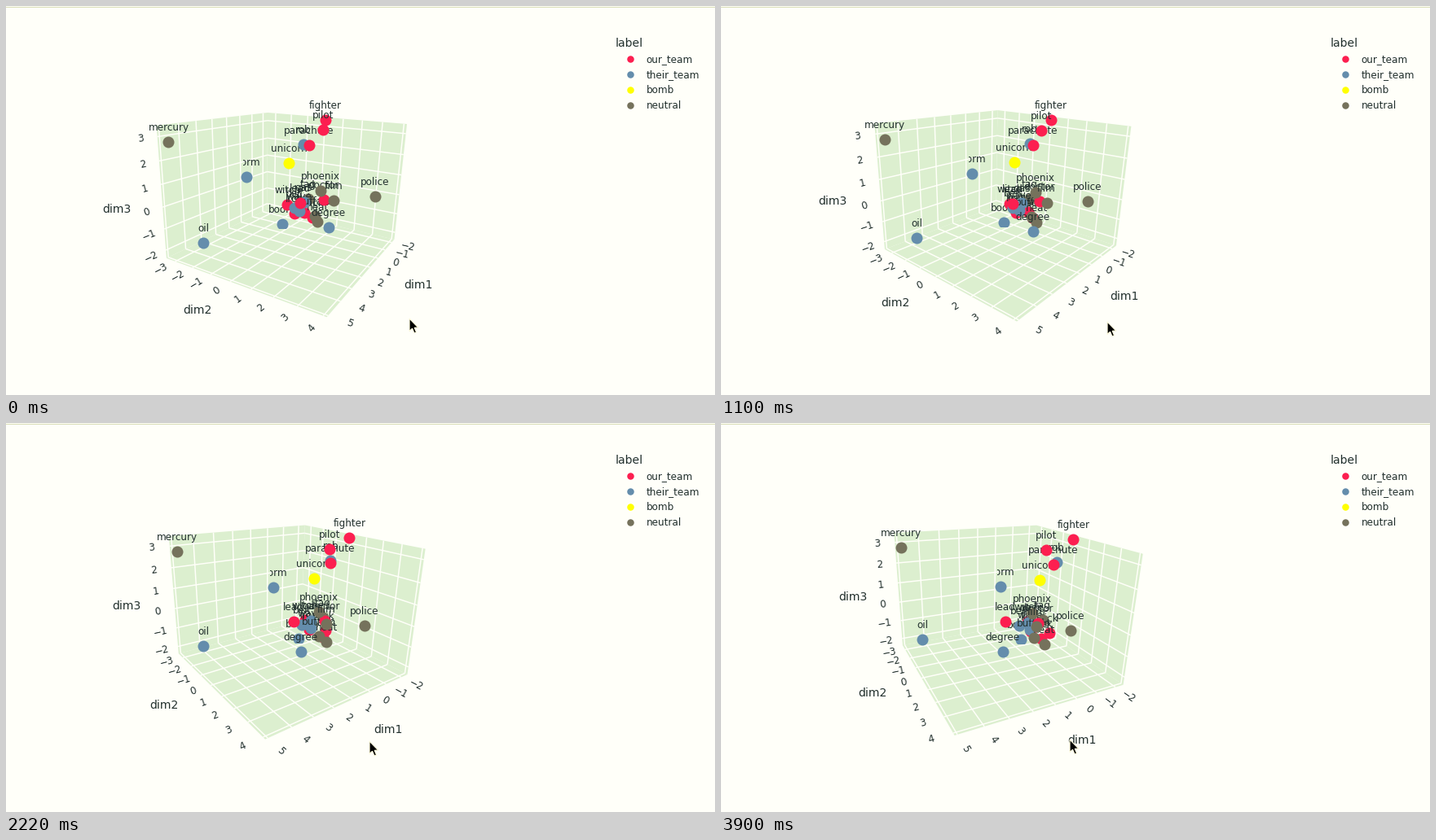
Recreate the animation shown at these times as a matplotlib script. Size 870 by 478 pixels, loop 4 s.

```python
import numpy as np
import matplotlib.pyplot as plt
from matplotlib.animation import FuncAnimation
from matplotlib.collections import LineCollection, PolyCollection
from matplotlib.patches import Polygon, Rectangle

W, H, DPI = 870, 478, 64                    # both sides divide exactly by 64
PX = 72 / DPI                               # points per pixel
FOCAL, CX, CY, ROLL = 468, 348.3, 225.3, 0.0245
HALF = np.array([0.2256, 0.2269, 0.1687])   # half sizes of the box
ZERO = np.array([-0.0800, -0.0178, -0.0306])
UNIT = np.array([0.0599, 0.0592, 0.0578])
TICKS = [range(-2, 6), range(-3, 5), range(-2, 4)]
EDGE = np.array([[0, 1, -1], [1, 0, -1], [1, -1, 0]])
OUT = [1, 0, 0]                             # axis along which labels stand off
TICK_GAP, NAME_GAP = 0.046, 0.123

INK, PAPER, WALL = "#22302e", "#fffff9", "#dcefcf"
RED, BLUE, YELLOW, GREY = "#fc1f50", "#648dac", "#ffff00", "#75725c"

# camera and pointer along the drag, by step
STEP = [1, 15, 33, 48, 57, 64, 71]
AZIM = [30.9, 36.4, 43.2, 52.8, 58.2, 61.0, 62.5]
ELEV = [16.5, 17.5, 18.6, 19.7, 20.0, 20.1, 20.2]
MOUSE_STEP = [1, 15, 33, 48, 57, 71, 84]
MOUSE_X = [495, 482, 466, 446, 435, 429, 428]
MOUSE_Y = [384, 387, 389, 391, 391, 389.5, 389]

# word, colour, screen place at the start and at the end of the turn
WORDS = [
    ("fighter", RED, 392, 140, 432.5, 143),
    ("pilot", RED, 389, 152, 399, 156.5),
    ("parachute", RED, 372, 171, 408, 174),
    ("rob", BLUE, 365, 170, 412, 171),
    ("unicorn", YELLOW, 347, 193, 391.5, 193),
    ("mercury", GREY, 199.5, 167, 220.5, 153),
    ("worm", BLUE, 295, 209.5, 343, 201),
    ("oil", BLUE, 242, 291.5, 247, 266),
    ("police", GREY, 453, 233.5, 428.5, 255.5),
    ("phoenix", GREY, 385.5, 227, 382, 234),
    ("film", GREY, 402, 239, 387, 250),
    ("doctor", RED, 390, 238, 389, 246),
    ("tag", GREY, 371, 237, 395, 242),
    ("lead", RED, 361, 242, 348.5, 244.5),
    ("witch", RED, 345, 243, 376, 245),
    ("boom", BLUE, 339, 268.5, 368, 266),
    ("degree", BLUE, 395.5, 272, 345.5, 282),
    ("heat", GREY, 382, 264.5, 396.5, 273),
    ("back", RED, 376, 260, 393, 265),
    ("tick", RED, 366, 254, 403, 258),
    ("iron", RED, 354, 255, 379.5, 256),
    ("bell", BLUE, 354, 248, 366, 249),
    ("wave", BLUE, 360, 252.5, 379, 253),
    ("gas", BLUE, 366, 244, 377, 242),
    ("buffalo", GREY, 379, 258, 384, 264),
]


def view(azim, elev):
    """Rows: right, up and towards the eye, with a slight roll."""
    a, e = np.radians([azim, elev])
    right = np.array([-np.sin(a), np.cos(a), 0])
    up = np.array([-np.sin(e) * np.cos(a), -np.sin(e) * np.sin(a), np.cos(e)])
    eye = np.array([np.cos(e) * np.cos(a), np.cos(e) * np.sin(a), np.sin(e)])
    return np.array([right + ROLL * up, up - ROLL * right, eye])


def project(p, cam):
    q = np.asarray(p) @ cam.T
    w = FOCAL / (1 - q[..., 2])
    return np.stack([CX + q[..., 0] * w, CY - q[..., 1] * w], axis=-1)


def locate(sights):
    """Point in space seen at (u, v) from each camera."""
    rows, rhs = [], []
    for cam, u, v in sights:
        rows += [FOCAL * cam[0] + (u - CX) * cam[2],
                 -FOCAL * cam[1] + (v - CY) * cam[2]]
        rhs += [u - CX, v - CY]
    return np.linalg.lstsq(np.array(rows), np.array(rhs), rcond=None)[0]


def make_walls():
    walls = []
    for k in range(3):
        i, j = [n for n in range(3) if n != k]
        quad = np.tile(-HALF, (4, 1))
        quad[:, i] = HALF[i] * np.array([-1, 1, 1, -1])
        quad[:, j] = HALF[j] * np.array([-1, -1, 1, 1])
        walls.append(quad)
    return np.array(walls)


def make_grid():
    lines = []
    for i in range(3):
        for t in TICKS[i]:
            for j in range(3):
                if j != i:
                    seg = np.tile(-HALF, (2, 1))
                    seg[:, i] = ZERO[i] + UNIT[i] * t
                    seg[1, j] = HALF[j]
                    lines.append(seg)
    return np.array(lines)


def step_at(frame):
    """Two quick steps and a pause, every 140 ms."""
    turn, phase = divmod(frame * 20 + 20, 140)
    return 3 * turn + min(phase // 20, 2)


first, last = view(AZIM[0], ELEV[0]), view(AZIM[-1], ELEV[-1])
points = np.array([locate([(first, a, b), (last, c, d)])
                   for _, _, a, b, c, d in WORDS])
walls3, grid3 = make_walls(), make_grid()

fig = plt.figure(figsize=(W / DPI, H / DPI), dpi=DPI, facecolor=PAPER)
ax = fig.add_axes([0, 0, 1, 1])
ax.set_xlim(0, W)
ax.set_ylim(H, 0)
ax.axis("off")


def write(x, y, s, size=12, **kw):
    return ax.text(x, y, s, fontsize=size * PX, color=INK,
                   family="DejaVu Sans", **kw)


def dot(x, y, color, size):
    return ax.plot([x], [y], "o", ms=size * PX, mfc=color, mew=0)[0]


ax.plot([0, W], [0.5, 0.5], color="#d9dcb6", lw=PX)

write(748, 50, "label", 14)
legend = [("our_team", RED), ("their_team", BLUE),
          ("bomb", YELLOW), ("neutral", GREY)]
for n, (name, color) in enumerate(legend):
    dot(766, 65 + 19 * n, color, 8.5)
    write(785.5, 69 + 19 * n, name)

walls = PolyCollection([], facecolors=WALL, edgecolors="none", zorder=1)
grid = LineCollection([], colors=PAPER, linewidths=1.5 * PX, zorder=2)
ax.add_collection(walls, autolim=False)
ax.add_collection(grid, autolim=False)

mid = dict(ha="center", va="center", rotation_mode="anchor", zorder=3)
tick_text = []
for i in range(3):
    for t in TICKS[i]:
        p = EDGE[i] * HALF
        p[i] = ZERO[i] + UNIT[i] * t
        far = p.copy()
        far[OUT[i]] += TICK_GAP
        text = write(0, 0, str(t).replace("-", "\u2212"), **mid)
        tick_text.append((text, np.array([p, far])))

names = []
for i in range(3):
    p = EDGE[i] * HALF
    p[OUT[i]] += NAME_GAP
    names.append((write(0, 0, f"dim{i + 1}", 14, **mid), p))

dots = [dot(0, 0, w[1], 14) for w in WORDS]
tags = [write(0, 0, w[0], ha="center", va="baseline", clip_on=True)
        for w in WORDS]
WORM = [w[0] for w in WORDS].index("worm")
BOOM = [w[0] for w in WORDS].index("boom")

ARROW = np.array([[0, 0], [0, 15.5], [3.5, 12.3], [6, 18], [8.6, 16.9],
                  [6.2, 11.3], [10.8, 11.1]])
arrow = Polygon(ARROW, closed=True, fc="black", ec="#fffde0", lw=1.2 * PX,
                zorder=100)
ax.add_patch(arrow)


def clip(artist, x, y, w, h):
    artist.set_clip_path(Rectangle((x, y), w, h, transform=ax.transData))


def draw(frame):
    step = step_at(frame)
    cam = view(np.interp(step, STEP, AZIM), np.interp(step, STEP, ELEV))

    walls.set_verts(list(project(walls3, cam)))
    grid.set_segments(list(project(grid3, cam)))

    for text, ends in tick_text:
        near, far = project(ends, cam)
        dx, dy = far - near
        if dx < 0:
            dx, dy = -dx, -dy
        text.set_position(far)
        text.set_rotation(np.degrees(np.arctan2(-dy, dx)))
    for text, p in names:
        text.set_position(project(p, cam))

    spots = project(points, cam)
    order = np.argsort(points @ cam[2])     # far to near
    for rank, n in enumerate(order):
        x, y = spots[n]
        dots[n].set_data([x], [y])
        tags[n].set_position((x, y - 14))
        dots[n].set_zorder(10 + 2 * rank)
        tags[n].set_zorder(11 + 2 * rank)

    # parts of two words and one dot stay hidden
    x, y = spots[WORM]
    clip(tags[WORM], x - 4, y - 40, 60, 40)
    x, y = spots[BOOM]
    clip(tags[BOOM], x - 40, y - 40, 48, 40)
    clip(dots[BOOM], x - 20, y - 20, 40, 24.5)

    tip = [np.interp(step, MOUSE_STEP, MOUSE_X),
           np.interp(step, MOUSE_STEP, MOUSE_Y)]
    arrow.set_xy(ARROW + tip)
    return []


anim = FuncAnimation(fig, draw, frames=200, interval=20, repeat=True,
                     init_func=lambda: draw(0), blit=False,
                     cache_frame_data=False)
plt.show()
```
